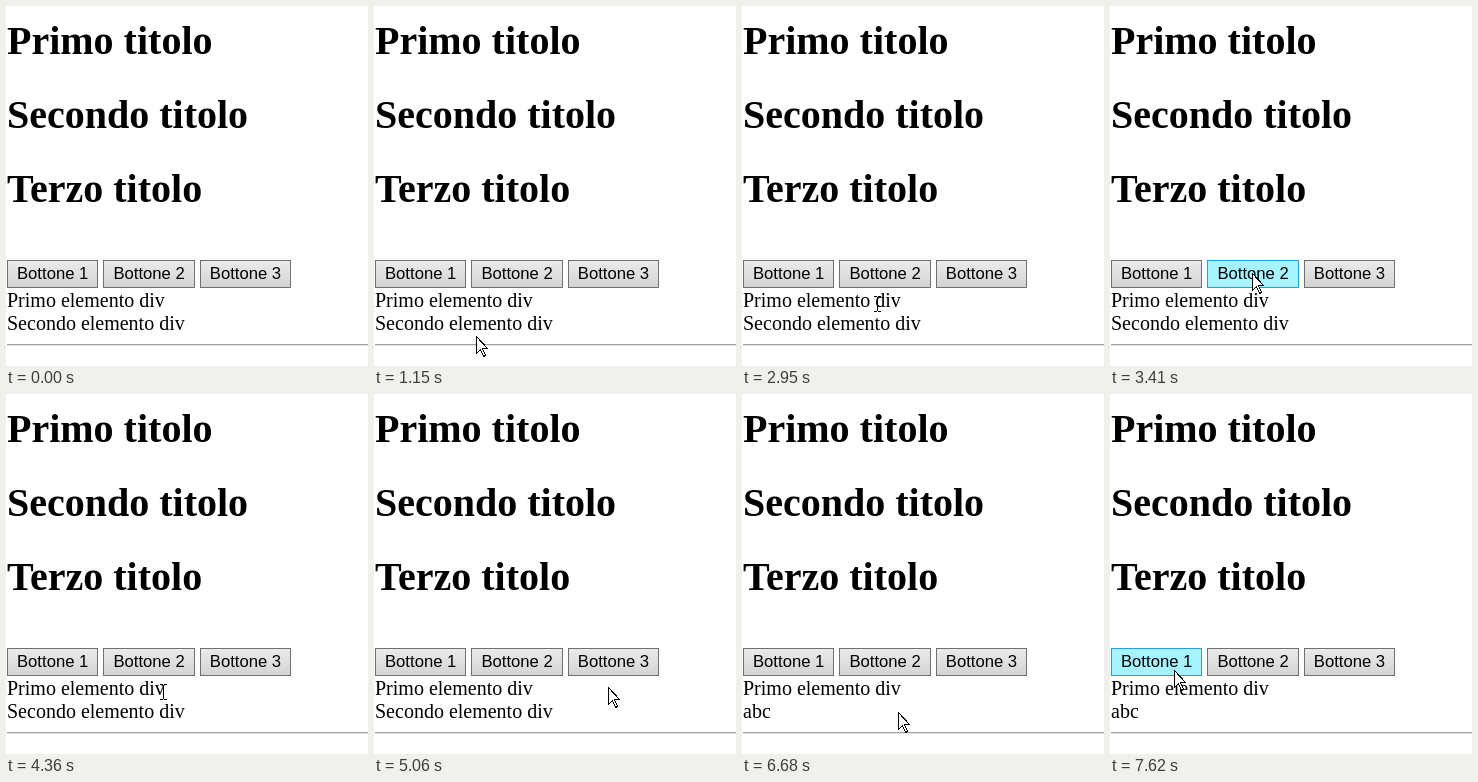
An HTML page for the animation above (8 s loop, 362 px wide and 360 px high).

```html
<!DOCTYPE html>
<html lang="it">
<head>
<meta charset="utf-8">
<title>Bottoni</title>
<style>
  html, body { margin: 0; width: 100%; height: 100%; overflow: hidden; background: #fff; }
  svg { display: block; width: 362px; height: 360px; }
  text { fill: #000; font-family: "Liberation Serif", "Times New Roman", serif; font-size: 20px; }
  .h text { font-size: 40px; font-weight: bold; }
  .b text { font-family: "Liberation Sans", Arial, sans-serif; font-size: 16.667px; }
  .b rect { fill: url(#face); stroke: #707070; }
  .b.over rect { fill: #a6f3ff; stroke: #26a0da; }
  #arrow, #beam { stroke: #000; shape-rendering: crispEdges; }
</style>
</head>
<body>
<svg viewBox="0 0 362 360">
  <defs>
    <linearGradient id="face" x2="0" y2="1">
      <stop stop-color="#ebebeb"/>
      <stop offset="1" stop-color="#d3d3d3"/>
    </linearGradient>
  </defs>
  <g class="h">
    <text x="1" y="48">Primo titolo</text>
    <text x="1" y="122">Secondo titolo</text>
    <text x="1" y="196">Terzo titolo</text>
  </g>
  <g class="b"><rect/><text y="273">Bottone 1</text></g>
  <g class="b"><rect/><text y="273">Bottone 2</text></g>
  <g class="b"><rect/><text y="273">Bottone 3</text></g>
  <text class="line" x="1" y="301">Primo elemento div</text>
  <text class="line" x="1" y="324" id="second">Secondo elemento div</text>
  <path d="M1 338.5H362" stroke="#a0a0a0"/>
  <path d="M1 339.5H362" stroke="#e3e3e3"/>
  <path id="arrow" d="M.5 .5V17.5L4.5 13.5L7.5 20.5L9.5 19.5L6.5 12.5H11.5Z" fill="#fff"/>
  <path id="beam" d="M0 .5H3M4 .5H7M3.5 1V15M0 15.5H3M4 15.5H7" fill="none"/>
</svg>
<script>
const LOOP = 8000, CLICK = 5290, STEP = 78;
const BUTTON = { width: 91.4, pitch: 96.4, top: 254, bottom: 282 };
const ENTRY = [120, 372];
const $ = id => document.getElementById(id);
const lines = [...document.querySelectorAll('.line')];

const buttons = [...document.querySelectorAll('.b')].map((el, i) => {
  const x = 1 + BUTTON.pitch * i;
  const left = Math.round(x), right = Math.round(x + BUTTON.width);
  const box = { x: left + 0.5, y: BUTTON.top + 0.5, width: right - left - 1, height: BUTTON.bottom - BUTTON.top - 1 };
  for (const key in box) el.firstChild.setAttribute(key, box[key]);
  el.lastChild.setAttribute('x', x + 10);
  return { el, left, right };
});

// Each glide starts where the last one ended; bend is the curve's control point.
const glides = [
  { from: 930, till: 1550, to: [60, 280], bend: [95, 300] },
  { from: 1780, till: 1780, to: [60, 276] },
  { from: 2480, till: 2950, to: [135, 298], bend: [84, 330] },
  { from: 3030, till: 3260, to: [142, 276] },
  { from: 3340, till: 3410, to: [142, 267] },
  { from: 4190, till: 4360, to: [157, 298] },
  { from: 4430, till: 4990, to: [234, 306], bend: [195, 345] },
  { from: 5060, till: 5060, to: [234, 293] },
  { from: 5140, till: 5290, to: [234, 276] },
  { from: 6380, till: 6680, to: [156, 318], bend: [200, 312] },
  { from: 6760, till: 7150, to: [84, 303], bend: [115, 318] },
  { from: 7230, till: 7390, to: [64, 280] },
  { from: 7620, till: 7620, to: [64, 276] }
];

// The pointer moves along a quadratic curve in hard steps.
function pointer(t) {
  const n = glides.filter(g => t >= g.from).length - 1;
  if (n < 0) return null;
  const { from, till, to, bend } = glides[n];
  const a = n ? glides[n - 1].to : ENTRY;
  const gaps = Math.round((till - from) / STEP);
  const done = gaps ? Math.floor((t - from) / (till - from) * gaps + 0.1) : 0;
  const k = Math.min(1, (done + 1) / (gaps + 1));
  return to.map((b, i) => {
    const c = bend ? bend[i] : (a[i] + b) / 2;
    return Math.round((1 - k) ** 2 * a[i] + 2 * k * (1 - k) * c + k * k * b);
  });
}

function place(el, x, y, shown) {
  el.setAttribute('transform', `translate(${x} ${y})`);
  el.style.display = shown ? '' : 'none';
}

function draw(t) {
  const at = pointer(t), [x, y] = at || [0, 0];
  $('second').textContent = t >= CLICK ? 'abc' : 'Secondo elemento div';
  const onText = lines.some((line, i) => {
    const top = 283 + 23 * i;
    return y >= top && y < top + 23 && x < 1 + line.getComputedTextLength();
  });
  for (const { el, left, right } of buttons) {
    el.classList.toggle('over', y >= BUTTON.top && y < BUTTON.bottom && x >= left && x < right);
  }
  place($('arrow'), x, y, at && !onText);
  place($('beam'), x - 3, y - 8, at && onText);
}

const start = performance.now();
function tick() {
  draw((performance.now() - start) % LOOP);
  requestAnimationFrame(tick);
}
tick();
</script>
</body>
</html>
```
